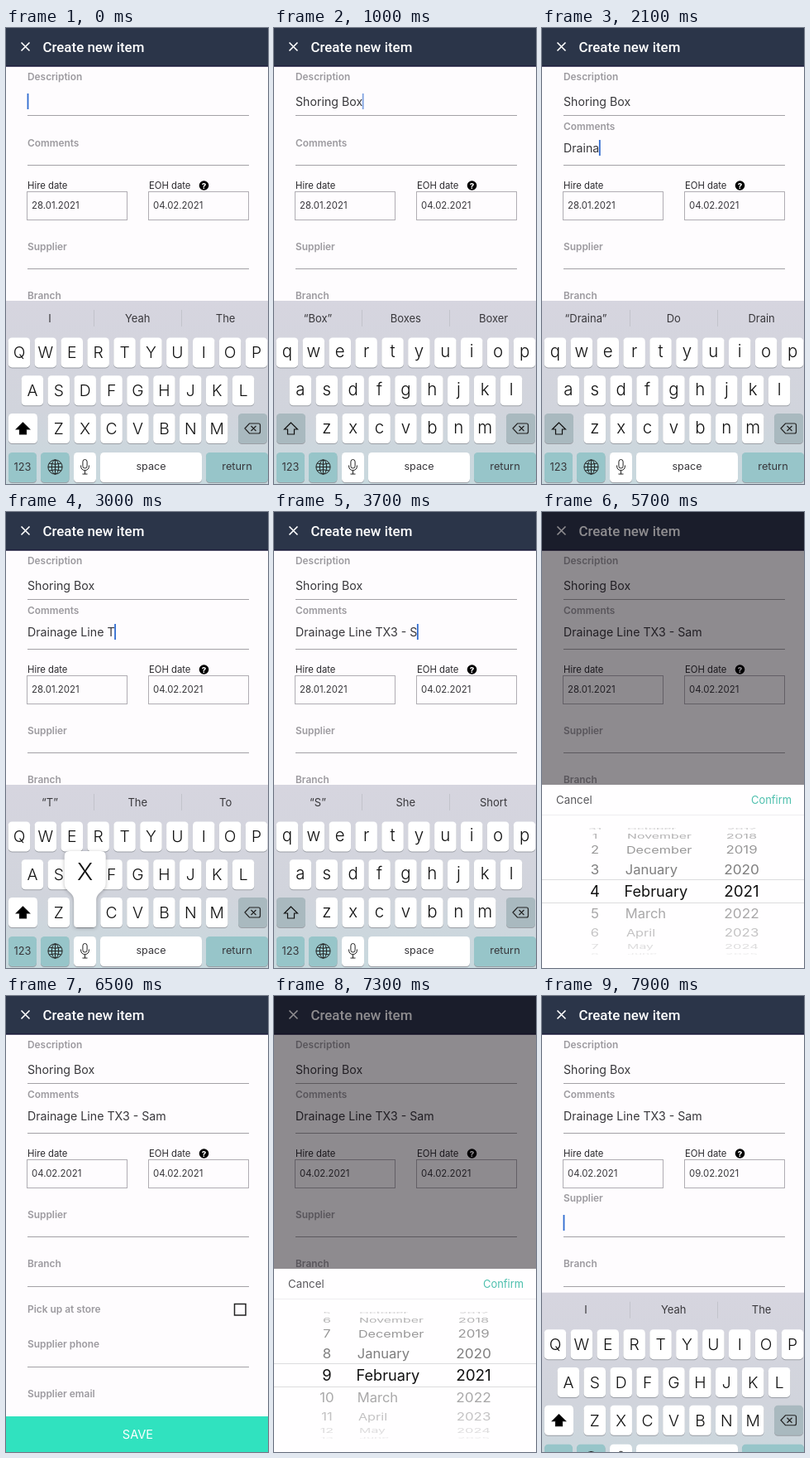
An HTML page that plays this animation: 317x550 px, repeating every 8 s.

```html
<!DOCTYPE html>
<html lang="en">
<head>
<meta charset="utf-8">
<title>Create new item</title>
<style>
html, body { margin: 0; width: 100%; height: 100%; overflow: hidden; background: #fefcfe; }
svg { display: block; width: 317px; height: 550px; }
text { font-family: Inter, Roboto, sans-serif; white-space: pre; }
</style>
</head>
<body>
<svg id="stage" viewBox="0 0 317 550"></svg>
<script>
const stage = document.getElementById('stage');
const ctx = document.createElement('canvas').getContext('2d');
const DESCRIPTION = 'Shoring Box', COMMENTS = 'Drainage Line TX3 - Sam';
const MONTHS = ['January', 'February', 'March', 'April', 'May', 'June', 'July',
  'August', 'September', 'October', 'November', 'December'];
const INK = '#38373b', GREY = '#9c9a9f', TEAL = '#97c5c9', KEY_GREY = '#a9b9bf';
const FORM_SIZE = 14.2, BOARD_H = 221;
const DEFS = '<defs><linearGradient id="board" x2="0" y2="1"><stop stop-color="#d6d5df"/>' +
  '<stop offset=".6" stop-color="#d1d4dc"/><stop offset="1" stop-color="#c8d9de"/></linearGradient></defs>';

const clamp = x => Math.max(0, Math.min(1, x));
const ramp = (n, a, b) => clamp((n - a) / (b - a));
const ease = x => x * x * (3 - 2 * x);
const escapeText = s => s.replace(/&/g, '&amp;').replace(/</g, '&lt;');

function text(x, y, s, size, fill = INK, extra = '') {
  return `<text x="${x}" y="${y}" font-size="${size}" fill="${fill}" ${extra}>${escapeText(s)}</text>`;
}
const centred = (x, y, s, size, fill, extra = '') => text(x, y, s, size, fill, `text-anchor="middle" ${extra}`);
const glyph = (x, y, s, size) => centred(x, y, s, size, '#111', 'font-weight="300"');
const rect = (x, y, w, h, fill, extra = '') =>
  `<rect x="${x}" y="${y}" width="${w}" height="${h}" fill="${fill}" ${extra}/>`;
const path = (d, stroke, width = 1, fill = 'none') =>
  `<path d="${d}" stroke="${stroke}" stroke-width="${width}" fill="${fill}"/>`;
const label = (y, s) => text(26, y, s, 11.9, GREY, 'font-weight="600"');
const rule = y => path(`M26 ${y}H294`, '#a3a1a6');

// State of the form at step n (one step is 100 ms)
function stateAt(n) {
  const description = DESCRIPTION.slice(0, Math.round(n * 1.1));
  const count = Math.max(0, n - (n < 32 ? 15 : 16));
  const comments = COMMENTS.slice(0, count);
  const focus = n < 12 ? 'description' : n < 40 ? 'comments' : n < 77 ? '' : 'supplier';
  const typed = focus === 'description' ? description : focus === 'comments' ? comments : '';
  const full = focus === 'description' ? DESCRIPTION : focus === 'comments' ? COMMENTS : '';
  return {
    n, description, comments, focus, typed,
    next: full[typed.length] || '',
    typing: (n > 0 && n < 10) || (n > 15 && n < 39),
    numbers: n >= 32 && n < 36,
    hire: n < 64 ? '28.01.2021' : '04.02.2021',
    eoh: n < 75 ? '04.02.2021' : '09.02.2021',
    board: n < 40 ? 1 : n < 50 ? 1 - ramp(n, 39, 42) : n < 78 ? 0 : n === 78 ? .5 : .87
  };
}

function field(y, value, focused, n) {
  ctx.font = `${FORM_SIZE}px Inter, Roboto, sans-serif`;
  const x = 25.6 + ctx.measureText(value).width;
  const caret = rect(x, y - 15, 1.8, 19, '#2f6bd0', `opacity="${n % 40 === 10 ? .6 : 1}"`);
  return text(26, y, value, FORM_SIZE) + (focused ? caret : '');
}

function dateBox(x, title, value) {
  return text(x, 194, title, 11.3, '#2a292d') +
    rect(x - .5, 197.5, 121, 34, 'none', 'stroke="#b0adb3"') +
    text(x + 5, 218, value, 11.4);
}

function form(s) {
  const commentsY = 142.5 - 20 * ramp(s.n, 11, 13);
  const supplierY = 267.5 - 20 * ramp(s.n, 76, 78);
  return rect(0, 0, 317, 550, '#fefcfe') +
    rect(0, 0, 317, 46, '#2b3549') + path('M0 46H317', '#1d1d3c', 1.4) +
    path('M18.5 17.5L28.5 27.5M28.5 17.5L18.5 27.5', '#fff', 1.6) +
    text(44.5, 29, 'Create new item', 16.9, '#fff', 'font-weight="500" style="font-family:Roboto,sans-serif"') +
    label(62.5, 'Description') + field(94, s.description, s.focus === 'description', s.n) +
    label(commentsY, 'Comments') + field(150, s.comments, s.focus === 'comments', s.n) +
    dateBox(26, 'Hire date', s.hire) + dateBox(173, 'EOH date', s.eoh) +
    '<circle cx="239.5" cy="190" r="5.8"/>' +
    centred(239.5, 193.6, '?', 9.5, '#fff', 'font-weight="800"') +
    label(supplierY, 'Supplier') + field(279, '', s.focus === 'supplier', s.n) +
    label(327, 'Branch') + label(382, 'Pick up at store') +
    rect(276.5, 371.5, 13.5, 13.5, 'none', 'stroke="#222" stroke-width="1.5"') +
    label(424, 'Supplier phone') + label(484, 'Supplier email') +
    [105.5, 165.5, 290.5, 350.5, 447.5].map(rule).join('') +
    rect(0, 507, 317, 43, '#30e2bf') + centred(159.5, 534, 'SAVE', 14.6, '#fff');
}

function key(x, y, w, fill = '#fff') {
  return rect(x, y + 1, w, 36, '#9a9ea5', 'rx="4.5"') + rect(x, y, w, 36, fill, 'rx="4.5"');
}

function popup(cx, y, s) {
  const bx = Math.max(27, Math.min(290, cx)), l = bx - 25, r = bx + 25, kl = cx - 13.5, kr = cx + 13.5;
  const d = `M${l} ${y - 50}q0 -6 6 -6H${r - 6}q6 0 6 6V${y - 18}C${r} ${y - 6} ${kr} ${y - 8} ${kr} ${y + 4}` +
    `V${y + 32}q0 4 -4 4H${kl + 4}q-4 0 -4 -4V${y + 4}C${kl} ${y - 8} ${l} ${y - 6} ${l} ${y - 18}Z`;
  return `<g style="filter:drop-shadow(0 1px 2px #0004)">${path(d, 'none', 0, '#fff')}</g>` +
    glyph(bx, y - 21.5, s, 29);
}

function suggestions(typed) {
  const word = typed.split(' ').pop();
  if (!word) return typed ? ['and', 'the', 'is'] : ['I', 'Yeah', 'The'];
  const more = { S: ['She', 'Short'], B: ['Boxes', 'Boxer'], D: ['Do', 'Drain'], L: ['Like', 'Lines'], T: ['The', 'To'] };
  return ['“' + word + '”', ...(more[word[0]] || ['', ''])];
}

function keyboard(s) {
  const upper = !s.typed || /[A-Z]/.test(s.next);
  const rows = s.numbers ? ['1234567890', '-/:;()$&@"', ".,?!'"] : ['QWERTYUIOP', 'ASDFGHJKL', 'ZXCVBNM'];
  let out = rect(0, 329, 317, 222, 'url(#board)') + path('M106.5 340V360M212.5 340V360', '#c2c3cb');
  let bubble = '';
  suggestions(s.typed).forEach((w, i) => out += centred(53 + 106.3 * i, 354.5, w, 13));
  rows.forEach((row, r) => {
    const y = [373.4, 419.2, 465][r], wide = s.numbers && r === 2;
    const pitch = wide ? 44 : 31.9, w = wide ? 38 : 26.5;
    [...row].forEach((c, i) => {
      const cx = 159.5 + (i - (row.length - 1) / 2) * pitch;
      const face = upper || s.numbers ? c : c.toLowerCase();
      out += key(cx - w / 2, y, w) + glyph(cx, y + (face === c ? 25 : 23.5), face, face === c ? 19.3 : 20.5);
      if (s.typing && s.n % 2 === 0 && c === s.next.toUpperCase()) bubble = popup(cx, y, face);
    });
  });
  const on = upper && !s.numbers;
  out += key(3, 465, 35, on ? '#fff' : KEY_GREY) + key(281, 465, 35, KEY_GREY);
  out += s.numbers ? centred(20.5, 488, '#+=', 12.5)
    : path('M20.5 476l-8 8h4v6h8v-6h4z', '#111', 1.2, on ? '#000' : 'none');
  out += path('M289 483l5.5 -6h11q2 0 2 2v8q0 2 -2 2h-11zM296.5 480l6 6M302.5 480l-6 6', '#222', 1.2);
  out += key(3, 512, 34, TEAL) + centred(20, 533.5, s.numbers ? 'ABC' : '123', 12.8);
  out += key(42, 512, 34.5, TEAL) + '<g fill="none" stroke="#222"><circle cx="59.5" cy="529.5" r="8.6"/>' +
    '<ellipse cx="59.5" cy="529.5" rx="4.2" ry="8.6"/><path d="M59.5 521V538M51 529.5H68M52 525Q59.5 527.5 67 525M52 534Q59.5 531.5 67 534"/></g>';
  out += key(82, 512, 27) + rect(92.9, 520.5, 5.2, 10.5, 'none', 'rx="2.6" stroke="#222"') +
    path('M90.5 527.5q0 6 5 6t5 -6M95.5 533.5V538M92.5 538H98.5', '#222');
  out += key(114, 512, 123) + centred(175.5, 532.7, 'space', 12.6);
  out += key(242, 512, 75, TEAL) + centred(279.5, 532.7, 'return', 12.8);
  return `<g transform="translate(0 ${(1 - s.board) * BOARD_H})">${out}${bubble}</g>`;
}

// A cylinder of values seen from the front
function wheel(x, anchor, pos, valueAt, scale = 1) {
  let out = '';
  for (let i = Math.round(pos) - 4; i <= Math.round(pos) + 4; i++) {
    const d = i - pos, a = Math.abs(d), angle = d * .356;
    if (a > 4.2) continue;
    const size = scale * (16.6 - .35 * a + 1.2 * clamp(1 - 2 * a));
    const shift = anchor === 'start' ? 1.2 * Math.min(a, 3) : 0;
    const alpha = a < .5 ? 1 : Math.max(.08, (d < 0 ? .54 : .36) - .11 * (a - 1));
    const place = `translate(${x + shift} ${457.5 + 76 * Math.sin(angle)}) scale(1 ${Math.max(.08, Math.cos(angle))})`;
    out += `<g transform="${place}">${text(0, 6, valueAt(i), size, '#111', `text-anchor="${anchor}" opacity="${alpha}"`)}</g>`;
  }
  return out;
}

function picker(n) {
  const second = n > 65;
  const open = second ? ramp(n, 66, 68) * (1 - ramp(n, 74, 76))
    : n === 45 ? .85 : ramp(n, 45, 46) * (1 - ramp(n, 63, 65));
  if (!open) return '';
  const day = second ? 4 + 5 * ease(ramp(n, 68, 73)) : 28 + 7 * ease(ramp(n, 47, 53));
  const month = second ? 1 : ease(ramp(n, 52, 56));
  return rect(0, 0, 317, 550, '#060208', `opacity="${.45 * open}"`) +
    `<g transform="translate(0 ${(1 - open) * BOARD_H})">` +
    rect(0, 329, 317, 222, '#fffeff') + path('M0 365.5H317', '#efedf0') +
    text(17, 352, 'Cancel', 13.3, '#5a595d') + text(302, 352, 'Confirm', 12.9, '#4dbfad', 'text-anchor="end"') +
    path('M0 443.5H317M0 471.5H317', '#dcdcde') +
    wheel(64, 'middle', day, i => String((i + 30) % 31 + 1), 1.04) +
    wheel(99.5, 'start', month, i => MONTHS[(i + 12) % 12], 1.02) +
    wheel(241.5, 'middle', 2021, String, 1.06) + '</g>';
}

let shown = -1;
function draw(now) {
  const n = Math.floor(now % 8000 / 100);
  if (n !== shown) {
    const s = stateAt(n);
    stage.innerHTML = DEFS + form(s) + (s.board > 0 ? keyboard(s) : '') + picker(n);
    shown = n;
  }
  requestAnimationFrame(draw);
}
draw(performance.now());
</script>
</body>
</html>
```
